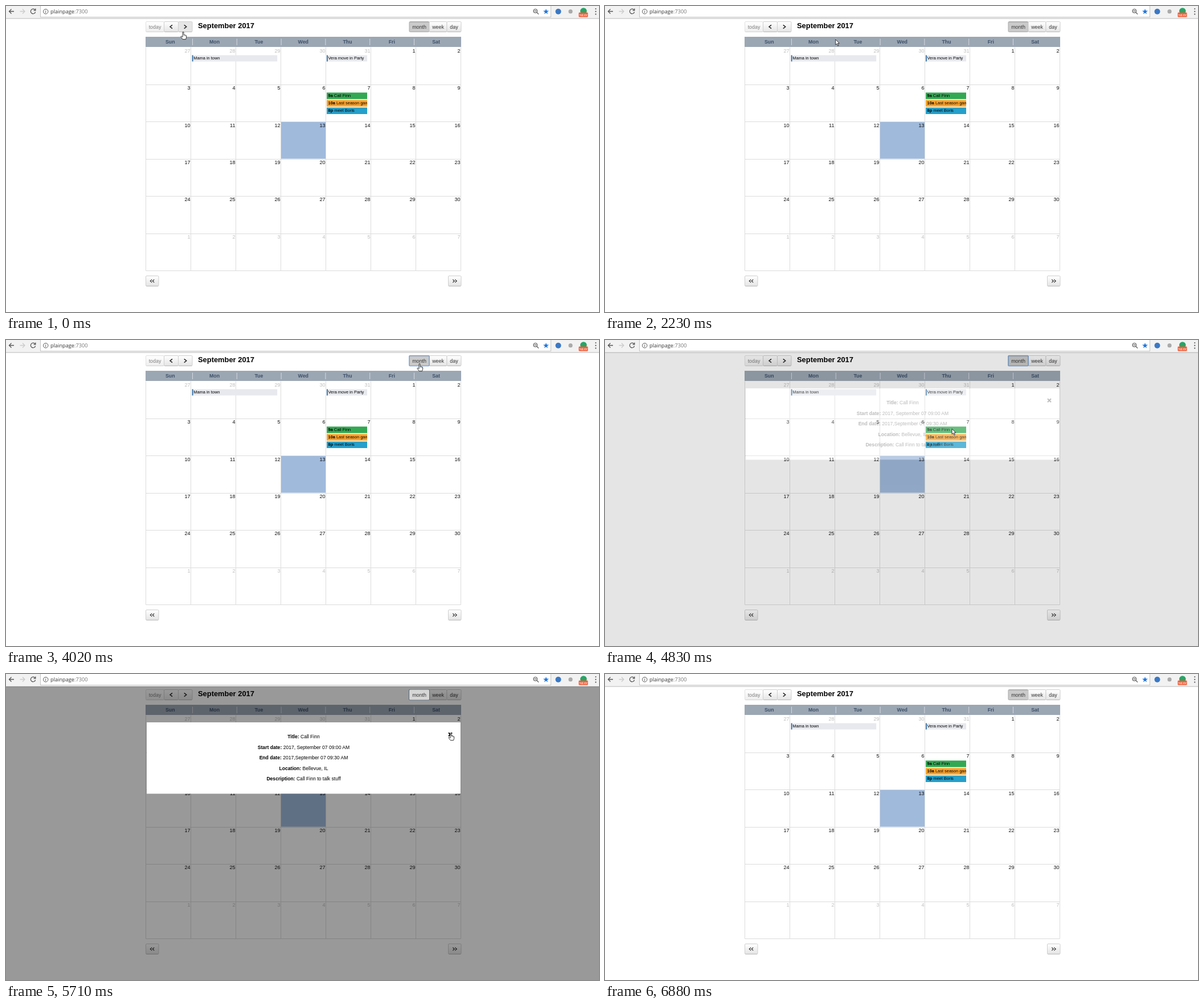
Recreate the animation shown at these times as an HTML page. Size 1041x538 px, loop 6960 ms.

```html
<!DOCTYPE html>
<html lang="en">
<head>
<meta charset="utf-8">
<title>Calendar</title>
<style>
  html, body { margin: 0; width: 100%; height: 100%; overflow: hidden; background: #fff; }
  svg { display: block; width: 100vw; height: 100vh; }
  text { font-family: "Liberation Sans", Arial, sans-serif; white-space: pre; }
  .mono { font-family: "Liberation Mono", monospace; }
  .serif { font-family: "Liberation Serif", serif; }
  .url { font-family: "Open Sans", sans-serif; }
</style>
</head>
<body>
<svg viewBox="0 0 1041 538">
  <defs>
    <linearGradient id="btn" x2="0" y2="1"><stop stop-color="#fff"/><stop offset="1" stop-color="#e4e4e4"/></linearGradient>
    <linearGradient id="submit" x2="0" y2="1"><stop stop-color="#2d94d6"/><stop offset="1" stop-color="#0b4c9c"/></linearGradient>
    <clipPath id="event"><rect x="563" y="86" width="71" height="110"/></clipPath>
  </defs>
  <g id="browser"></g>
  <g id="view"></g>
</svg>
<script>
const LOOP = 6960;
const LEFT = 245.5, RIGHT = 798.5, TOP = 72.5, BOTTOM = 465.5;
const DAYS = ['Sun', 'Mon', 'Tue', 'Wed', 'Thu', 'Fri', 'Sat'];
const MONTHS = { 8: 'September', 9: 'October', 10: 'November', 11: 'December' };
const HEAD = '#3d5068', BLUE = '#a0badc';

// Bursts of change: start, end, number of steps
const BURSTS = [[90, 90, 1], [240, 240, 1], [390, 390, 1], [790, 790, 1], [940, 940, 1],
  [1200, 1270, 2], [1440, 1520, 2], [1690, 1770, 2], [1990, 2680, 10], [2750, 3390, 10],
  [3470, 3560, 2], [3710, 4250, 8], [4500, 5160, 9], [5240, 5880, 9], [5960, 6040, 2], [6270, 6880, 9]];

// Time, view, month, pressed button, focused button
const STATES = [
  [0, 'month', 8, '', ''], [240, 'month', 8, 'next', 'next'], [390, 'month', 9, '', 'next'],
  [790, 'month', 9, 'next', 'next'], [940, 'month', 10, '', 'next'],
  [1200, 'month', 10, 'next', 'next'], [1270, 'month', 11, '', 'next'],
  [1440, 'month', 11, 'prev', 'prev'], [1520, 'month', 10, '', 'prev'],
  [1690, 'month', 10, 'today', 'today'], [1770, 'month', 8, '', ''],
  [2890, 'month', 8, 'week', 'week'], [2960, 'week', 8, '', 'week'],
  [3470, 'week', 8, 'day', 'day'], [3560, 'day', 8, '', 'day'],
  [3940, 'day', 8, 'month', 'month'], [4015, 'month', 8, '', 'month'], [5780, 'month', 8, '', '']];

const CURSOR = [[0, 311, 46], [1270, 311, 46], [1440, 290, 46], [1520, 290, 46], [1690, 262, 42],
  [1990, 262, 42], [2680, 690, 92], [2820, 749, 41], [3200, 749, 41], [3390, 787, 42],
  [3710, 787, 42], [3860, 726, 42], [4020, 726, 42], [4250, 705, 90], [4500, 690, 105],
  [4740, 609, 156], [5240, 609, 156], [5620, 781, 104], [5790, 781, 104], [5880, 725, 124],
  [6040, 566, 177], [6340, 576, 213], [6490, 576, 213], [6710, 780, 104], [6880, 780, 104]];
const HANDS = [[0, 1980], [2800, 3400], [3470, 4060], [4740, 4760], [5600, 5800], [6690, 6810]];
const INFO = [[4755, 0], [4828, .25], [5070, 1], [5712, 1], [5875, 0]];
const FORM = [[6345, 0], [6418, .285], [6600, 1], [6720, 1], [6875, 0]];

function snap(t) {
  let last = 0;
  for (const [a, b, n] of BURSTS) {
    for (let i = 0; i < n; i++) {
      const at = n > 1 ? a + (b - a) * i / (n - 1) : a;
      if (at <= t + .5) last = at;
    }
  }
  return last;
}

function track(keys, t) {
  if (t <= keys[0][0]) return keys[0].slice(1);
  for (let i = 1; i < keys.length; i++) {
    const [a, ...p] = keys[i - 1], [b, ...q] = keys[i];
    if (t <= b) return p.map((v, j) => v + (q[j] - v) * (t - a) / (b - a));
  }
  return keys[keys.length - 1].slice(1);
}

const rect = (x, y, w, h, fill, more = '') =>
  `<rect x="${x}" y="${y}" width="${w}" height="${h}" fill="${fill}" ${more}/>`;
const path = (d, stroke, width = 1, more = 'fill="none"') =>
  `<path d="${d}" stroke="${stroke}" stroke-width="${width}" ${more}/>`;
const dot = (x, y, r, fill, more = '') => `<circle cx="${x}" cy="${y}" r="${r}" fill="${fill}" ${more}/>`;
const text = (x, y, s, size = 8.8, more = '') => `<text x="${x}" y="${y}" font-size="${size}" ${more}>${s}</text>`;
const bold = s => `<tspan font-weight="700">${s}</tspan>`;
const MID = 'text-anchor="middle" ', END = 'text-anchor="end" ', B = 'font-weight="700" ';
const range = n => [...Array(n).keys()];

function browser() {
  const star = range(10).map(i => {
    const a = Math.PI * (i / 5 - .5), r = i % 2 ? 2.1 : 5.2;
    return `${948 + r * Math.cos(a)},${10 + r * Math.sin(a)}`;
  }).join(' ');
  return rect(0, 0, 1041, 22, '#f2f2f2') + rect(0, 21.5, 1041, 1, '#b9b9b9') +
    rect(60.5, -1, 896, 20.5, '#fff', 'stroke="#c4c4c4"') +
    path('M14 9.5H6M9.5 5.5L5.5 9.5L9.5 13.5', '#555', 1.3) +
    path('M24.5 9.5H32.5M29 5.5L33 9.5L29 13.5', '#ccc', 1.3) +
    path('M51 7A4.2 4.2 0 1 0 51.6 10.5M51.8 4.5V7.8H48.5', '#555', 1.3) +
    dot(69.7, 9.7, 4.2, 'none', 'stroke="#555"') + path('M69.7 9V12M69.7 7V8', '#555') +
    text(78, 13, 'plainpage<tspan fill="#777">:7300</tspan>', 9.2, 'class="url" fill="#333"') +
    dot(929.3, 8.7, 3.2, 'none', 'stroke="#555" stroke-width="1.2"') +
    path('M931.7 11.2L935 14.5M927.7 8.7H931', '#555', 1.2) +
    `<polygon points="${star}" fill="#2376dc"/>` +
    dot(969.5, 9.7, 5, '#3b78c4') + dot(991, 9.7, 3.6, '#aaa') + dot(1013.8, 9, 5.8, '#27a568') +
    rect(1005.5, 11.5, 16, 8, '#ee5a35', 'rx="1"') + text(1013.5, 17.8, 'NEW', 6, MID + 'fill="#fff"') +
    [5, 9.7, 14.4].map(y => dot(1035.3, y, 1.1, '#555')).join('');
}

function button(x, w, label, o = {}, y = 27.5, h = 18) {
  const fill = o.pressed || o.active ? '#cacaca' : o.hover ? '#e6e6e6' : 'url(#btn)';
  const cx = x + w / 2, cy = y + h / 2;
  const marks = { prev: [[-1, 1]], next: [[1, 1]], first: [[-1, -2], [-1, 2]], last: [[1, -2], [1, 2]] }[label];
  const face = marks
    ? marks.map(([d, s]) => {
        const single = marks.length === 1, k = single ? 2 : 1.5, v = single ? 3.2 : 2.6, mx = cx + (single ? 0 : s);
        return path(`M${mx - d * k} ${cy - v}L${mx + d * k} ${cy}L${mx - d * k} ${cy + v}`, '#222', single ? 1.5 : 1.1);
      }).join('')
    : text(cx, cy + 3, label, 8.9, MID + 'fill="#333"');
  return `<g opacity="${o.off ? .62 : 1}">` +
    rect(x, y, w, h, fill, `rx="1.5" stroke="${o.active || o.pressed ? '#a8a8a8' : '#cfcfcf'}"`) +
    (o.active || o.pressed ? path(`M${x + 1} ${y + 1}H${x + w - 1}`, '#b4b4b4') : path(`M${x + 1} ${y + h}H${x + w - 1}`, '#b8b8b8')) +
    (o.focus ? rect(x, y, w, h, 'none', 'rx="1" stroke="#7fa5d6" stroke-width="1.5"') : '') + face + '</g>';
}

function toolbar(view, month, pressed, focus, hover) {
  const title = { month: `${MONTHS[month]} 2017`, week: 'Sep 10 – 16, 2017', day: 'September 13, 2017' }[view];
  const make = (x, w, name) => button(x, w, name, {
    pressed: pressed === name, focus: focus === name, active: view === name,
    hover: hover === name, off: name === 'today' && month === 8 });
  const all = [[245.5, 32, 'today'], [277.5, 25, 'prev'], [302.5, 24.5, 'next'],
    [708, 35, 'month'], [743, 31, 'week'], [774, 25, 'day']];
  all.sort((a, b) => (a[2] === focus) - (b[2] === focus));
  return all.map(b => make(...b)).join('') + text(337, 39, title, 12.9, B) +
    button(245.5, 22.5, 'first', {}, 474.5, 18) + button(776.5, 22.5, 'last', {}, 474.5, 18);
}

function header(labels, start, step, seps) {
  return rect(245, 54.5, 554, 17.5, '#9ca7b4') + path('M245 55H799', '#8e99a7') +
    labels.map((s, i) => text(start + step * i, 66.3, s, 8.8, MID + B + `fill="${HEAD}"`)).join('') +
    seps.map(x => path(`M${x} 57.5V69`, '#d3d8de')).join('');
}

function events() {
  const tag = (x, w, s) => rect(x, 86.5, w, 11, '#e7e9ee') + rect(x, 86.5, 1.7, 11, '#2765a0') + text(x + 2.5, 94, s, 7.45);
  const timed = (y, fill, time, s) => rect(563, y, 71, 11.5, fill) + text(565.5, y + 7.7, `${bold(time)} ${s}`, 7.45);
  return tag(326.7, 149.5, 'Mama in town') + '<g clip-path="url(#event)">' + tag(563, 71, 'Vera move in Party') +
    timed(152.2, '#34a853', '9a', 'Call Finn') + timed(165.3, '#ffa328', '10a', 'Last season game') +
    timed(178.5, '#259fcb', '8p', 'meet Boris') + '</g>';
}

function monthView(month) {
  const first = new Date(Date.UTC(2017, month, 1)).getUTCDay();
  const rowY = i => Math.floor(73 + 65.4 * i) + .5;
  let out = month === 8 ? rect(482.5, 203.5, 79, 65, BLUE) : '';
  for (let i = 0; i <= 7; i++) out += path(`M${LEFT + 79 * i} ${TOP}V${BOTTOM}`, '#dcdcdc');
  for (let i = 1; i <= 6; i++) out += path(`M${LEFT} ${rowY(i)}H${RIGHT}`, '#dcdcdc');
  for (let i = 0; i < 42; i++) {
    const date = new Date(Date.UTC(2017, month, 1 - first + i));
    const fill = date.getUTCMonth() === month ? '#111' : '#bebebe';
    out += text(323.4 + 79 * (i % 7), 81.8 + 65.4 * Math.floor(i / 7), date.getUTCDate(), 9, END + `fill="${fill}"`);
  }
  return out + header(DAYS, 288.3, 77.8, range(6).map(i => 327.5 + 77.8 * i)) + (month === 8 ? events() : '');
}

function agenda(view) {
  const week = view === 'week', end = 787;
  const [x, w] = week ? [495, 72.8] : [277, 510];
  let out = rect(x, 72.5, w, 26, BLUE) + rect(x, 101, w, 364, BLUE);
  for (let i = 0; i < 28; i++) {
    const y = Math.round(101 + 13.16 * i) + .5;
    if (i) out += path(`M${i % 2 ? 277 : LEFT} ${y}H${end}`, i % 2 ? '#ededed' : '#dadada', 1,
      i % 2 ? 'stroke-dasharray="1 .5" opacity=".8"' : 'opacity=".9"');
  }
  const cols = week ? range(8).map(i => 277 + 72.8 * i) : [277, end];
  out += [LEFT, ...cols, RIGHT].map(c => path(`M${Math.floor(c) + .5} ${TOP}V${BOTTOM}`, '#dcdcdc')).join('');
  for (let i = 0; i < 14; i++) {
    const h = i + 6;
    out += text(274.3, 110 + 26.32 * i, (h > 12 ? h - 12 : h) + (h < 12 ? 'am' : 'pm'), 8.7, END);
  }
  out += text(274, 88.2, 'all-day', 8.7, END) + rect(LEFT, 98, 553, 3, '#e6e6e6') +
    rect(787.5, 101, 11, 364, '#f1f1f1') + rect(788.2, 198, 9.4, 196.5, '#c1c1c1') +
    '<path d="M790 109.5L792.9 106.3L795.8 109.5ZM790 457.3L792.9 460.5L795.8 457.3Z" fill="#444"/>' +
    path(`M${LEFT} ${BOTTOM}H${RIGHT}`, '#dcdcdc');
  const labels = week ? DAYS.map((d, i) => `${d} 9/${10 + i}`) : ['Wednesday'];
  const seps = week ? range(7).map(i => 280.5 + 71.8 * i) : [280.5];
  return out + header(labels, week ? 316.2 : 532, 71.8, [...seps, 787.5]);
}

function modal(bottom, opacity, body) {
  const hole = `M0 22H1041V538H0ZM247 85V${bottom}H797.8V85Z`;
  return `<g opacity="${opacity}"><path d="${hole}" fill="#000" fill-opacity=".4" fill-rule="evenodd"/>` +
    rect(247, 85, 550.8, bottom - 85, '#fff') +
    path('M777 103.3L783 109.3M783 103.3L777 109.3', '#111', 2.2) + body + '</g>';
}

function info() {
  return [['Title', 'Call Finn'], ['Start date', '2017, September 07 09:00 AM'], ['End date', '2017,September 07 09:30 AM'],
    ['Location', 'Bellevue, IL'], ['Description', 'Call Finn to talk stuff']]
    .map(([k, v], i) => text(522.5, 113.4 + 18.45 * i, `${bold(k + ':')} ${v}`, 8.6, MID)).join('');
}

function form() {
  const grey = 'fill="#888" ', mono = 'class="mono" ';
  const label = (x, y, s) => text(x, y, s, 8.6, 'fill="#555"');
  const box = (x, y, w, h, fill = '#fff') => rect(x, y, w, h, fill, 'stroke="#bbb"');
  const radio = (x, s) => dot(x, 148, 7, '#fff', 'stroke="#aaa"') + label(x + 10, 149.8, s);
  const hint = 'mm/dd/yyyy --:-- --';
  return text(517.3, 124.5, 'Add event', 17.4, MID + B) +
    radio(463.8, 'Practice') + radio(514.3, 'Game') + radio(557, 'Other') +
    label(260, 161, 'Title') + box(260, 168.5, 525, 26.5) + text(273, 185, 'Title..', 8.6, grey) +
    label(264, 208, 'Start date:') + label(523.5, 208, 'End date:') +
    box(264, 215, 257, 29) + box(523.5, 215, 257.5, 29) +
    text(277.5, 233, hint, 8, mono + grey) + rect(566, 224, 24, 11, '#3390ff') +
    text(537, 233, hint.replace('yyyy', '<tspan fill="#fff">yyyy</tspan>'), 8, mono + grey) +
    label(260, 257, 'Location:') + box(260, 264.5, 525, 26.5) + text(273, 281, 'Location.. e.g. Seattle,WA', 8.4, grey) +
    label(260, 303.5, 'Description:') + box(260, 306.5, 525, 91.5, '#f6f6f6') +
    text(273, 322.5, 'Description here..', 7.55, mono + grey) +
    rect(469.5, 401, 105.5, 24.5, 'url(#submit)', 'rx="5" stroke="#1d6fb5"') +
    text(522, 416.3, 'Submit', 9, 'class="serif" fill="#fff" ' + MID + B);
}

function pointer(t) {
  if (t >= 6870) return '';
  const [x, y] = track(CURSOR, t);
  const hand = HANDS.some(([a, b]) => t >= a && t < b);
  const shape = hand
    ? 'M-1 0Q0-1 1 0V4.5Q2 3.8 2.7 5Q3.7 4.3 4.3 5.6Q5.6 5.2 5.6 6.8V9.2L4.6 12.6H-.8L-4 8.2Q-4.2 6.8-2.6 7.2L-1 8.6Z'
    : 'M0 0V9.6L2.2 7.6L3.9 11.4L5.5 10.7L3.8 7H6.8Z';
  return `<g transform="translate(${x.toFixed(2)} ${y.toFixed(2)})">` +
    path(shape, '#222', .9, 'fill="#fff" stroke-linejoin="round"') +
    (hand ? path('M1 4.5V7M2.7 5V7.2M4.3 5.6V7.4', '#555', .5) : '') + '</g>';
}

function scene(t) {
  const [, view, month, pressed, focus] = STATES.filter(s => s[0] <= t + 1).pop();
  const hover = t < 1400 ? 'next' : t < 1680 ? 'prev' : '';
  let out = (view === 'month' ? monthView(month) : agenda(view)) + toolbar(view, month, pressed, focus, hover);
  const [a] = track(INFO, t), [b] = track(FORM, t);
  if (a > 0) out += modal(210.3, a, info());
  if (a > .95) out += rect(708, 27.5, 35, 18, '#d6d6d6', 'rx="1.5"') + text(725.5, 39.5, 'month', 8.9, MID + 'fill="#333"');
  if (b > 0) out += modal(437.5, b, form());
  return out + pointer(t);
}

const layer = document.getElementById('view');
document.getElementById('browser').innerHTML = browser();
const begin = performance.now();
let shown = -1;

function frame() {
  const t = snap((performance.now() - begin) % LOOP);
  if (t !== shown) layer.innerHTML = scene(shown = t);
  requestAnimationFrame(frame);
}
frame();
</script>
</body>
</html>
```
